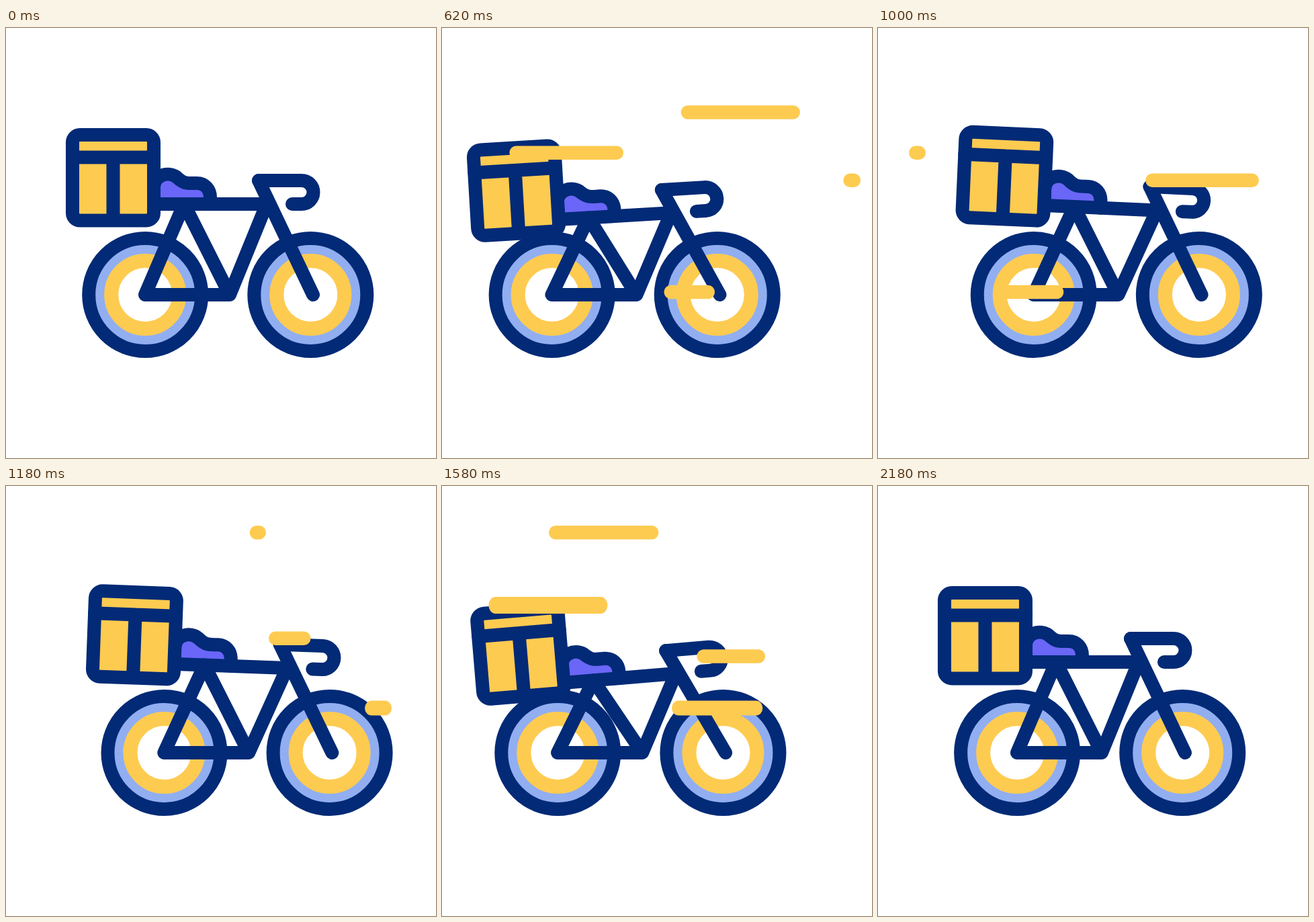
These frames come from a looping animation (640x640 px, 2.4 s). An HTML page:

```html
<!DOCTYPE html>
<html lang="en">
<head>
<meta charset="utf-8">
<title>Delivery bike</title>
<style>
  html, body { margin: 0; width: 100%; height: 100%; overflow: hidden; background: #fff; }
  svg { display: block; width: 100%; height: 100%; }
  .ink { fill: none; stroke: #022a76; stroke-width: 20; stroke-linecap: round; stroke-linejoin: round; }
  .tyre { fill: #91aef1; }
  .rim { fill: #fff; stroke: #fecb51; stroke-width: 21; }
  .seat { fill: #6a66f7; }
  .box, .streak { fill: #fecb51; }
</style>
</head>
<body>
<svg viewBox="0 0 640 640">
  <defs>
    <g id="wheel">
      <circle class="ink tyre" r="84"/>
      <circle class="rim" r="50.5"/>
    </g>
  </defs>
  <g id="wheels">
    <use href="#wheel" x="207.2" y="397"/>
    <use href="#wheel" x="453.3" y="397"/>
  </g>
  <g id="body">
    <path class="ink seat" d="M220 262V238C220 218 242 213 254 222C266 233 270 231 284 231C296 231 304 240 304 252V262"/>
    <path class="ink" d="M220 262H388M426 262H440A17.5 17.5 0 0 0 440 227H376"/>
  </g>
  <path id="tubes" class="ink"/>
  <g id="cargo">
    <rect class="ink box" x="99" y="159" width="121" height="127.5" rx="11"/>
    <path class="ink" d="M99 192.5H220M159.5 192.5V286"/>
  </g>
  <g id="streaks"></g>
</svg>
<script>
const LOOP = 2400;
const BEAT = 545;
const PIVOT = { x: 262, y: 318 };
const CARGO_DROP = 0.64;
const $ = id => document.getElementById(id);

// The bike sways between one pose per beat; tilt leads and the wheels lag.
const shift = sway([0, -46.3, 32, -38, 0], 15);
const drop = sway([0, 21.5, 2.5, 28, 0], 0);
const tilt = sway([0, -3.9, 2.9, -4.9, 0], -15);

// Every streak grows leftwards, then its tail follows along the same path.
const TRAVEL = 212, SPAN = 480, TAIL_DELAY = 265, CAP = 10;
const streaks = [
  streak(556, 125.5, 236),
  streak(268, 185.8, 300),
  streak(396, 393, 460),
  streak(613, 226.8, 574),
  streak(564, 330.5, 1090, 22),
  streak(377, 69.2, 1140),
  streak(271, 177.5, 1193, 25),
  streak(471, 253.6, 1378)
];

function ease(u) {
  u = Math.min(1, Math.max(0, u));
  return u * u * (3 - 2 * u);
}

function sway(poses, lag) {
  return t => poses.reduce((value, pose, i) =>
    i ? value + (pose - poses[i - 1]) * ease((t - lag) / BEAT - i + 1) : pose, 0);
}

function streak(x, y, start, height = 20.5) {
  const el = document.createElementNS("http://www.w3.org/2000/svg", "rect");
  const attrs = { class: "streak", y: y - height / 2, height, rx: CAP, ry: height / 2 };
  for (const name in attrs) el.setAttribute(name, attrs[name]);
  $("streaks").append(el);

  return t => {
    const age = t - start;
    const shown = age > 0 && age < TAIL_DELAY + SPAN;
    const head = x - TRAVEL * ease(age / SPAN);
    const tail = x - TRAVEL * ease((age - TAIL_DELAY) / SPAN);
    el.setAttribute("visibility", shown ? "visible" : "hidden");
    el.setAttribute("x", head - CAP);
    el.setAttribute("width", tail - head + 2 * CAP);
  };
}

function drawBike(t) {
  const dx = shift(t), dy = drop(t), angle = tilt(t);
  const cos = Math.cos(angle * Math.PI / 180), sin = Math.sin(angle * Math.PI / 180);
  const turn = `rotate(${angle} ${PIVOT.x} ${PIVOT.y})`;

  // Upper joints follow the body, lower ones stay level with the axles.
  const top = (x, y) => {
    const px = x - PIVOT.x, py = y - PIVOT.y;
    return `${PIVOT.x + px * cos - py * sin + dx} ${PIVOT.y + px * sin + py * cos + dy}`;
  };
  const low = x => `${x + dx} 397`;

  $("wheels").setAttribute("transform", `translate(${dx} 0)`);
  $("body").setAttribute("transform", `translate(${dx} ${dy}) ${turn}`);
  $("cargo").setAttribute("transform", `translate(${dx} ${dy * CARGO_DROP}) ${turn}`);
  $("tubes").setAttribute("d",
    `M${top(265, 262)}L${low(207)}L${low(333)}Z` +
    `M${low(333)}L${top(388, 262)}` +
    `M${top(376, 227)}L${low(457)}`);
}

const begin = performance.now();
function frame() {
  const t = (performance.now() - begin) % LOOP;
  drawBike(t);
  streaks.forEach(draw => draw(t));
  requestAnimationFrame(frame);
}
frame();
</script>
</body>
</html>
```
